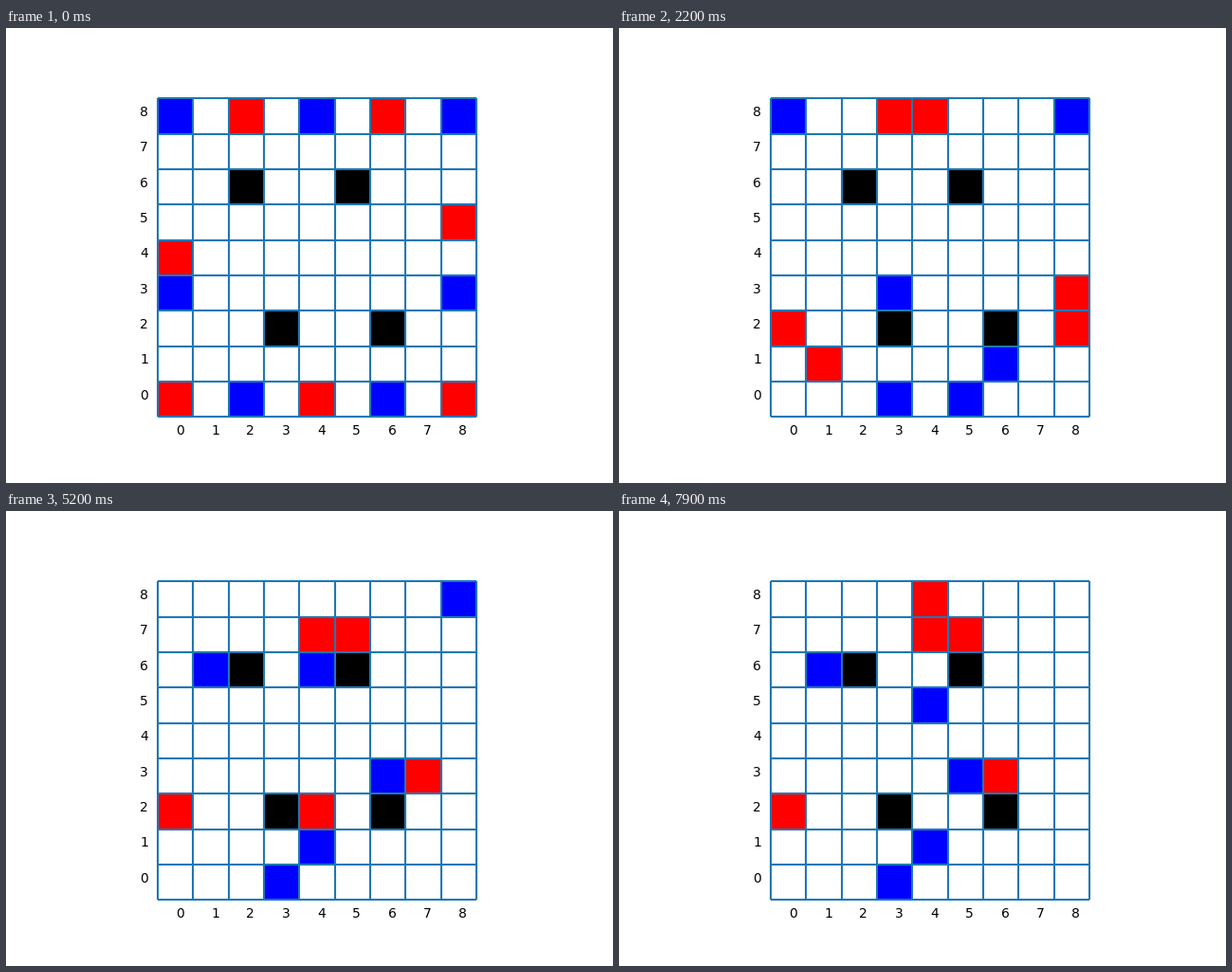
A matplotlib script that plays this animation: 640 px wide and 480 px high, repeating every 8 s.

```python
from itertools import chain, zip_longest

import matplotlib.pyplot as plt
from matplotlib.animation import FuncAnimation
from matplotlib.patches import Rectangle

SIZE = 9
FRAMES = 80
COLORS = {"B": "blue", "R": "red", "X": "black"}
STEPS = {"r": (1, 0), "l": (-1, 0), "u": (0, 1), "d": (0, -1)}

# Each side walks one piece after another: cell it stands on, then its path.
BLUE = "20r 60l 83ld 03rr 72dl 23rudruuu 08ddr 61luu 50u 53r 51l 63lrlddu 88l 52u 78dduddlll"
RED = "80uu 85dd 04dd 00ur 68l 28r 58l 11rr 48d 38r 82ddllu 47r 48d 83l 61luluuu 73l 45uluurrlrl"


def shift(cell, step, n=1):
    return cell[0] + n * step[0], cell[1] + n * step[1]


def setup():
    """Sides alternate along the top and bottom rows, in opposite order."""
    board = {}
    for x in range(0, SIZE, 2):
        board[x, SIZE - 1] = "BR"[x // 2 % 2]
        board[x, 0] = "RB"[x // 2 % 2]
    for x in (0, SIZE - 1):
        board[x, 3] = "B"
    board[0, 4] = board[SIZE - 1, 5] = "R"
    for block in ((2, 6), (5, 6), (3, 2), (6, 2)):
        board[block] = "X"
    return board


def walk(routes):
    """Yield the single moves of a side as (from, to)."""
    for route in routes.split():
        cell = int(route[0]), int(route[1])
        for way in route[2:]:
            goal = shift(cell, STEPS[way])
            yield cell, goal
            cell = goal


def flanked(board, cell, side):
    """True if the cell lies between two pieces of side or blocks."""
    return any(
        all(board.get(shift(cell, STEPS[way], n)) in (side, "X") for n in (1, -1))
        for way in "ru"
    )


def play(board, src, dst):
    board = dict(board)
    side = board[dst] = board.pop(src)
    enemy = "R" if side == "B" else "B"
    for step in STEPS.values():
        near = shift(dst, step)
        if board.get(near) == enemy and flanked(board, near, side):
            del board[near]
    return board


# The sides take turns, blue first.
boards = [setup()]
for move in filter(None, chain.from_iterable(zip_longest(walk(BLUE), walk(RED)))):
    boards.append(play(boards[-1], *move))

fig, ax = plt.subplots(figsize=(6.4, 4.8), dpi=100)
ax.set_aspect("equal")
ax.set_xlim(-0.45, SIZE + 0.45)
ax.set_ylim(-0.45, SIZE + 0.45)
ax.axis("off")

ax.hlines(range(SIZE + 1), 0, SIZE, color="C0", lw=1.5)
ax.vlines(range(SIZE + 1), 0, SIZE, color="C0", lw=1.5)
for i in range(SIZE):
    ax.text(i + 0.5, -0.5, str(i), fontsize=10)
    ax.text(-0.5, i + 0.5, str(i), fontsize=10)

tiles = {
    (x, y): ax.add_patch(Rectangle((x, y), 1, 1, lw=0, visible=False))
    for x in range(SIZE)
    for y in range(SIZE)
}


def draw(frame):
    board = boards[frame]
    for cell, tile in tiles.items():
        kind = board.get(cell)
        tile.set_visible(kind is not None)
        if kind:
            tile.set_facecolor(COLORS[kind])
    return list(tiles.values())


# Keep the grid above the tiles.
for lines in ax.collections:
    lines.set_zorder(2)

anim = FuncAnimation(fig, draw, frames=FRAMES, interval=100, repeat=True, repeat_delay=0)
plt.show()
```
